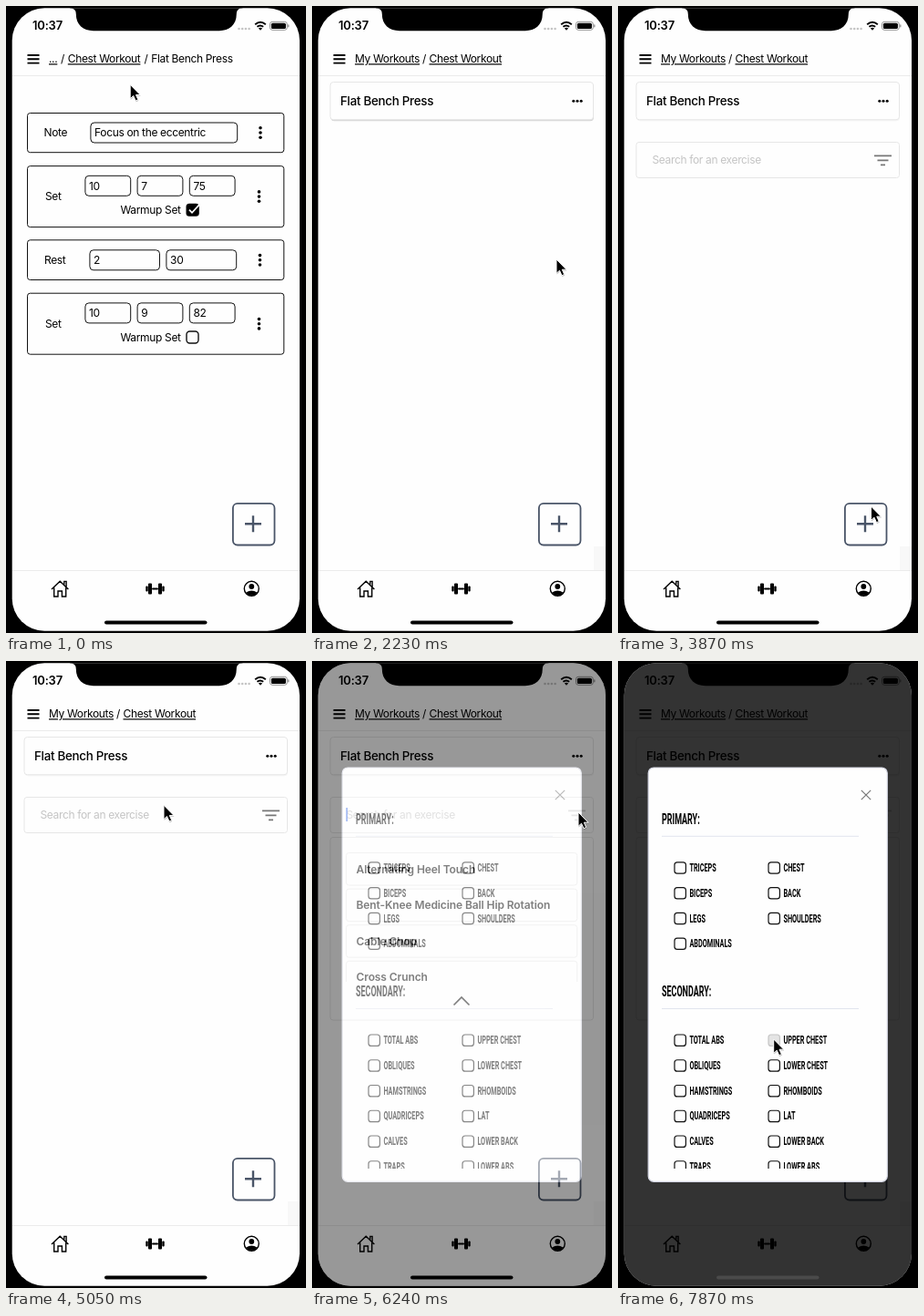
Write an HTML page that moves like this. It is 329x688 px and loops after 8 s.

```html
<!DOCTYPE html>
<html lang="en">
<head>
<meta charset="utf-8">
<title>Workout planner</title>
<style>
  html, body { margin: 0; width: 100%; height: 100%; overflow: hidden; background: #000; }
  svg { display: block; width: 100%; height: 100%; }
  text { font: 400 12px Inter, sans-serif; letter-spacing: -.35px; }
  .clock { font-weight: 600; font-size: 13px; letter-spacing: -.2px; }
  .link { text-decoration: underline; }
  .title { font-weight: 500; font-size: 13.4px; letter-spacing: -.3px; }
  .item { font-weight: 600; letter-spacing: -.1px; }
  .hint { fill: #c4c4c4; }
  .caps { font: 700 12.7px Roboto, sans-serif; letter-spacing: 0; }
  .head { font-size: 15.6px; }
  .box { fill: #fefefe; stroke: #111; stroke-width: 1; }
  .soft { fill: #fefefe; stroke: #e6e6e6; stroke-width: 1; }
  .check { fill: #fefefe; stroke: #111; stroke-width: 1.2; }
  .line { fill: none; stroke: #000; stroke-width: 1.4; }
</style>
</head>
<body>
<svg id="stage" viewBox="0 0 329 688" preserveAspectRatio="none"></svg>
<script>
const LOOP = 8000, START = 600, TICK = 148.4;

const text = (x, mid, str, cls = '', id = '') =>
  `<text x="${x}" y="${mid + 4.3}" class="${cls}" id="${id}">${str}</text>`;
const caps = (x, mid, str, cls = '') =>
  `<text transform="translate(${x} ${mid + (cls ? 5.5 : 4)}) scale(.575 1)" class="caps ${cls}">${str}</text>`;
const rect = (x1, y1, x2, y2, r, cls, extra = '') =>
  `<rect x="${x1}" y="${y1}" width="${x2 - x1}" height="${y2 - y1}" rx="${r}" class="${cls}" ${extra}/>`;
const path = (d, extra = '') => `<path d="${d}" class="line" ${extra}/>`;
const dot = (x, y, r, fill = '#000') => `<circle cx="${x}" cy="${y}" r="${r}" fill="${fill}"/>`;
const group = (id, ...parts) => `<g id="${id}">${parts.join('')}</g>`;
const kebab = (x, y) => [-5.2, 0, 5.2].map(d => dot(x, y + d, 1.8)).join('');
const field = (x1, x2, mid, value) =>
  rect(x1, mid - 11, x2, mid + 11, 4, 'box') + text(x1 + 4.2, mid, value);

const row = (label, x, top, bottom, mid, dotsX) =>
  rect(23.5, top, 304.8, bottom, 3, 'box') + text(x, mid, label) + kebab(dotsX, mid);

const setRow = (top, values) =>
  row('Set', 43, top, top + 67, top + 33.5, 277.5) +
  values.map((v, i) => field(86.9 + i * 57.2, 136.7 + i * 57.2, top + 21.7, v)).join('') +
  text(125.5, top + 48.3, 'Warmup Set');

const exercisePage = group('exercise',
  text(47, 58, '...', 'link'), text(60, 58, '/'),
  text(67.8, 58, 'Chest Workout', 'link', 'crumb'),
  text(151.5, 58, '/'), text(159.3, 58, 'Flat Bench Press'),
  row('Note', 41.5, 117.5, 160.7, 139, 279),
  field(92.9, 253.7, 139, 'Focus on the eccentric'),
  setRow(175.6, [10, 7, 75]),
  rect(197.5, 216.8, 211.8, 230.8, 3.5, ''),
  path('M201 223.6l3 3.2 8.6-9.4', 'style="stroke:#fefefe;stroke-width:1.7"'),
  row('Rest', 42, 256.8, 300.5, 278.8, 278.5),
  field(91.9, 168.5, 278.8, 2), field(175.9, 252.7, 278.8, 30),
  setRow(315.2, [10, 9, 82]),
  rect(198, 357, 211, 370, 3.5, 'check', 'style="stroke-width:1.4"'));

const exercises = ['Alternating Heel Touch', 'Bent-Knee Medicine Ball Hip Rotation', 'Cable Chop', 'Cross Crunch'];

const workoutPage = group('workout',
  text(47, 58, 'My Workouts', 'link'), text(121, 58, '/'), text(128.5, 58, 'Chest Workout', 'link'),
  rect(309, 593, 322, 619, 0, '', 'fill="#f8f8f8"'),
  rect(20.5, 84.5, 309, 126.3, 4, '', 'fill="#d4d4d4" id="shade"'),
  rect(20, 83.5, 308.5, 124.8, 3.5, 'soft'),
  text(31, 104.5, 'Flat Bench Press', 'title'),
  [286.8, 291, 295.2].map(x => dot(x, 104.2, 1.5)).join(''),
  group('search',
    rect(20, 149.5, 308.5, 188.5, 3, 'soft'),
    text(37.5, 168.7, 'Search for an exercise', 'hint'),
    path('M281 164.3h19M284.5 169.3h12M288 174.3h5', 'id="filter" style="stroke:#777;stroke-width:1.8"')),
  group('list',
    rect(37.4, 161, 39, 176, 0, '', 'fill="#3f6fe8"'),
    rect(20, 193.5, 308.5, 394, 3, 'soft'),
    '<g clip-path="url(#listClip)">',
    exercises.map((name, i) =>
      rect(37.5, 210.5 + i * 39.6, 290.8, 246 + i * 39.6, 3, 'soft') +
      text(48.5, 228.3 + i * 39.5, name, 'item')).join(''),
    '</g>',
    path('M155.5 377.5l8.5-8.5 8.5 8.5', 'style="stroke-width:1.6"')));

const chrome = [
  path('M23.5 54h13M23.5 58.3h13M23.5 62.6h13', 'style="stroke-width:1.9"'),
  path('M7 76.5h315M7 619.5h315', 'style="stroke:#ebebeb;stroke-width:1"'),
  rect(248.9, 545.9, 294.5, 591.5, 5, '', 'fill="#fefefe" stroke="#4a5568" stroke-width="1.8"'),
  path('M262 568.3h18M271 559.3v18', 'style="stroke:#4a5568;stroke-width:2.4"'),
  path('M50 640l9.2-8.8 9.2 8.8M52.7 638.2v9.8h4.3v-6h4.4v6h4.3v-9.8M63.8 634.7v-3.3h2.3v5.6'),
  [[153.3, 636.5, 2.4, 6], [156, 633.5, 4, 12], [160, 638.4, 7, 2.2], [167, 633.5, 4, 12], [171.3, 636.5, 2.4, 6]]
    .map(([x, y, w, h]) => rect(x, y, x + w, y + h, 1, '')).join(''),
  '<circle cx="269.3" cy="639.3" r="8" class="line"/>',
  dot(269.3, 637, 2.9),
  '<path d="M263.3 643.4q6-4 12 0q-2 3.4-6 3.4t-6-3.4z"/>'
].join('');

const statusBar = [
  text(29, 22, '10:37', 'clock'),
  [255.5, 259.2, 262.9, 266.6].map(x => dot(x, 25, 1.3, '#c4c4c4')).join(''),
  path('M273.2 20.2q5.8-5 11.6 0M275.4 22.8q3.4-2.8 6.8 0', 'style="stroke-width:1.9"'),
  '<path d="M276.9 24.6q2.1-1.5 4.2 0l-2.1 2.2z"/>',
  rect(289.5, 17.3, 308.3, 26.3, 2.6, '', 'fill="none" stroke="#888" stroke-width=".9"'),
  rect(290.9, 18.7, 306.9, 24.9, 1.5, ''),
  rect(309.2, 20.2, 310.4, 23.4, .6, '', 'fill="#888"')
].join('');

const option = (name, i, top) => {
  const x = 68.2 + (i % 2) * 103, y = top + (i >> 1) * 27.75;
  return rect(x - 6.2, y - 6.2, x + 6.2, y + 6.2, 3, 'check',
    name === 'UPPER CHEST' ? 'id="hovered"' : '') + caps(x + 10.2, y, name);
};
const section = (title, y, names) =>
  caps(48, y, title, 'head') +
  path(`M48 ${y + 19}h216`, 'style="stroke:#e1e4ee;stroke-width:1"') +
  names.map((name, i) => option(name, i, y + 53.7)).join('');

const modal = group('modal',
  rect(0, 0, 329, 688, 0, '', 'fill="#000" fill-opacity=".8"'),
  rect(33.2, 117, 295.3, 571.3, 6, '', 'fill="#fefefe" stroke="#d3d5e2" stroke-width="1.2"'),
  path('M266.8 141.8l10.4 10.4M277.2 141.8l-10.4 10.4', 'style="stroke:#777;stroke-width:1.2"'),
  '<g clip-path="url(#modalClip)">',
  section('PRIMARY:', 173.3, ['TRICEPS', 'CHEST', 'BICEPS', 'BACK', 'LEGS', 'SHOULDERS', 'ABDOMINALS']),
  section('SECONDARY:', 362.5, ['TOTAL ABS', 'UPPER CHEST', 'OBLIQUES', 'LOWER CHEST', 'HAMSTRINGS', 'RHOMBOIDS',
    'QUADRICEPS', 'LAT', 'CALVES', 'LOWER BACK', 'TRAPS', 'LOWER ABS']),
  '</g>');

const arrow = 'M0 0V15.4L3.5 12.2 6 17.7 8.7 16.5 6.3 11.2H11z';

document.getElementById('stage').innerHTML = `
  <defs>
    <clipPath id="screenClip">${rect(6.7, 2.3, 322, 685.7, 35.5, '')}</clipPath>
    <clipPath id="listClip">${rect(30, 200, 300, 352, 0, '')}</clipPath>
    <clipPath id="modalClip">${rect(34, 120, 294, 557, 0, '')}</clipPath>
  </defs>
  <rect width="329" height="688"/>
  <g clip-path="url(#screenClip)">
    <rect width="329" height="688" fill="#fefefe"/>
    ${exercisePage}${workoutPage}${chrome}${statusBar}${modal}
    ${rect(108, 674.4, 220.5, 678.6, 2.1, '', 'id="bar"')}
    <path d="M70 0V2.3q6.8 0 6.8 6.5c0 12 8 18.4 19 18.4h138c11 0 19-6.4 19-18.4q0-6.5 6.8-6.5V0z"/>
  </g>
  <g id="cursor">
    <path d="${arrow}" transform="translate(.5 1.2)" opacity=".25"/>
    <path d="${arrow}" stroke="#fff" stroke-width="1" stroke-linejoin="round"/>
  </g>`;

// [tick, x, y] of the pointer tip
const pointer = [
  [-1, 136.2, 86.3], [0, 135, 83], [2, 125, 68], [4, 120, 60], [7, 121, 62], [9, 170, 120], [10, 225, 200],
  [11, 268, 278], [12, 279, 410], [13, 281, 505], [15, 279, 549], [22, 277.5, 549],
  [23, 283, 535], [24, 291, 440], [25, 293, 300], [26, 268, 208], [27, 222, 168], [29, 173, 158],
  [33, 173, 159], [34, 188, 161], [35, 230, 164], [36, 275, 167], [37, 292, 166], [39, 292, 166],
  [40, 285, 190], [41, 262, 260], [42, 235, 330], [43, 212, 385], [45, 190, 412], [47, 176, 414], [49, 170.7, 415]
];

// Linear interpolation over rows of [tick, ...values]
const sample = (rows, k) => {
  const i = rows.findIndex(r => r[0] >= k);
  if (i < 0) return rows.at(-1).slice(1);
  if (i === 0) return rows[0].slice(1);
  const a = rows[i - 1], b = rows[i], p = (k - a[0]) / (b[0] - a[0]);
  return a.slice(1).map((v, j) => v + (b[j + 1] - v) * p);
};
const ramp = (k, from, to) => Math.min(1, Math.max(0, (k - from) / (to - from)));
const grey = v => `rgb(${v},${v},${v})`;

const el = id => document.getElementById(id);
const show = (id, on) => el(id).setAttribute('opacity', Number(on));

function draw(t) {
  const k = Math.max(-1, Math.floor((t - START + 4) / TICK));
  const [x, y] = sample(pointer, k);
  el('cursor').setAttribute('transform', `translate(${x} ${y})`);
  show('exercise', k < 6);
  show('workout', k >= 6);
  el('crumb').style.fill = grey(205 * ramp(k, 1, 4));
  show('shade', 1 - .75 * ramp(k, 11, 14));
  show('search', k >= 18);
  show('list', k >= 31);
  show('filter', 1 - .65 * ramp(k, 35, 37));
  show('modal', k < 38 ? 0 : k === 38 ? .5 : k === 39 ? .98 : 1);
  el('bar').style.fill = k < 39 ? '#000' : '#4a4a4a';
  const hover = ramp(k, 46, 49);
  el('hovered').style.stroke = grey(17 + 180 * hover);
  el('hovered').style.fill = grey(254 - 26 * hover);
}

const begin = performance.now();
function frame() {
  draw((performance.now() - begin) % LOOP);
  requestAnimationFrame(frame);
}
frame();
</script>
</body>
</html>
```
